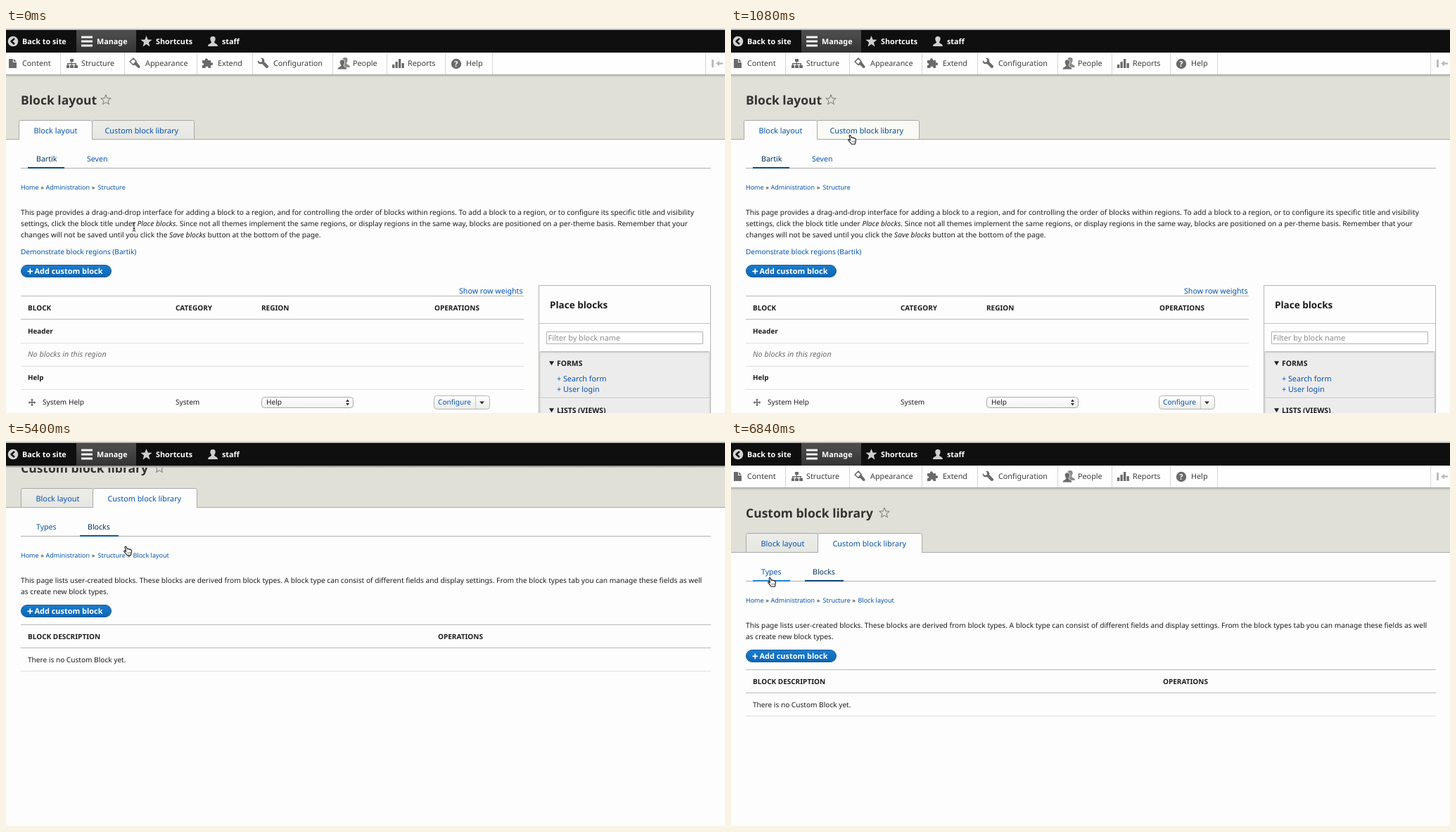
An HTML page with a canvas for the animation above (8000 ms loop, 1022x548 px).

```html
<!DOCTYPE html>
<html lang="en">
<head>
<meta charset="utf-8">
<title>Block layout</title>
<style>
html, body { margin: 0; width: 100%; height: 100%; overflow: hidden; background: #fdfdfd; }
canvas { display: block; }
</style>
</head>
<body>
<canvas id="stage" width="1022" height="548"></canvas>
<script>
const ctx = document.getElementById('stage').getContext('2d');
const LOOP = 8000;
const INK = '#1c1c1c', LINK = '#0652ae', DARK = '#06315c', PAGE = '#fdfdfd', ICON = '#6a6a6a';
const PRIMARY = ['#1c7dcf', '#0c65b3'];

function rect(x, y, w, h, color) {
  ctx.fillStyle = color;
  ctx.fillRect(x, y, w, h);
}

function gradient(y, h, top, bottom) {
  const g = ctx.createLinearGradient(0, y, 0, y + h);
  g.addColorStop(0, top);
  g.addColorStop(1, bottom);
  return g;
}

function box(x, y, w, h, radius, fill, border) {
  ctx.beginPath();
  ctx.roundRect(x + .5, y + .5, w - 1, h - 1, radius);
  ctx.fillStyle = fill;
  ctx.fill();
  ctx.strokeStyle = border;
  ctx.lineWidth = 1;
  ctx.stroke();
}

// y is the middle of the capital letters
function text(s, x, y, size = 10.2, color = INK, style = '') {
  ctx.font = `${style} ${size}px "Noto Sans", "Open Sans", sans-serif`;
  ctx.textRendering = 'geometricPrecision';
  ctx.fillStyle = color;
  ctx.fillText(s, x, y + size * .357);
  return x + ctx.measureText(s).width;
}

const bold = (s, x, y, size = 10, color = INK) => text(s, x, y, size, color, 'bold');

// Parts between asterisks are italic
function rich(s, x, y) {
  s.split('*').forEach((part, i) => { x = text(part, x, y, 10.2, INK, i % 2 ? 'italic' : ''); });
}

function shape(d, x, y, fill, stroke, width = 1) {
  const path = new Path2D(d);
  ctx.save();
  ctx.translate(x, y);
  ctx.lineWidth = width;
  ctx.lineJoin = 'round';
  if (fill) { ctx.fillStyle = fill; ctx.fill(path); }
  if (stroke) { ctx.strokeStyle = stroke; ctx.stroke(path); }
  ctx.restore();
}

function disc(x, y, r, color) {
  ctx.beginPath();
  ctx.arc(x, y, r, 0, Math.PI * 2);
  ctx.fillStyle = color;
  ctx.fill();
}

function star(x, y, r, fill, stroke) {
  let d = '';
  for (let i = 0; i < 10; i++) {
    const a = i * Math.PI / 5, k = i % 2 ? r * .42 : r;
    d += `${i ? 'L' : 'M'}${Math.sin(a) * k} ${-Math.cos(a) * k}`;
  }
  shape(d + 'Z', x, y, fill, stroke);
}

const person = 'M0-7C3-7 4-5 3.6-2.4C3.3-.6 2.2.6 2 1.6C2.2 3 7 3.4 7 7H-7C-7 3.4-2.2 3-2 1.6C-2.2.6-3.3-.6-3.6-2.4C-4-5-3-7 0-7Z';

function toolbar() {
  rect(0, 3, 1022, 32, '#0f0f0f');
  rect(100, 3, 85, 32, gradient(9, 26, '#4b4b4b', '#333'));
  disc(10, 19, 7.3, '#d4d4d4');
  shape('M2-4L-2.5 0L2 4', 10, 19, null, '#111', 2.4);
  for (const y of [11.5, 17.5, 23.5]) rect(107, y, 16, 3, '#f4f4f4');
  star(199.5, 19.5, 8.5, '#cfcfcf');
  shape(person, 294, 19, '#cfcfcf');
  [['Back to site', 23], ['Manage', 129], ['Shortcuts', 213], ['staff', 307]]
    .forEach(([s, x]) => bold(s, x, 19, 10.8, '#fff'));
}

function trayIcons() {
  shape('M0 0H6V5H11V13H0ZM7 0L11 4H7Z', 4, 44, ICON);
  shape('M5 0H10V4H8V6H14V9H16V13H11V9H12.5V7.5H8.2V9H10V13H5V9H6.8V7.5H2.5V9H4V13H0V9H1V6H6.8V4H5Z', 86, 44, ICON);
  shape('M0 5L5 0L9 4.5L5 9.5Z', 176, 43, null, ICON, 1.6);
  shape('M5 9.5L9 4.5L14.5 11.5C15 13.5 13 15 11.5 13.5L7.5 9.8Z', 176, 43, ICON);
  shape('M0 3H4C2.5 0 8.5-1.5 8 3H12V6.5C16 5 16.5 11 12 10V14H8.5C9 10.5 4 10.5 4.5 14H0V10C3 10.5 3 6.5 0 7Z', 279, 43, ICON);
  shape('M0 3L3 6L6 5L6 2L4 0C8-1 10 2 9 5L15 11C16 13 13 15 11.5 13.5L6 8C2 9-1 7 0 3Z', 358, 43, ICON);
  shape(person, 482, 49, '#8c8c8c');
  shape(person, 478, 52, ICON, '#fff', .8);
  [5, 9, 13, 7].forEach((h, i) => rect(549 + i * 4.5, 57 - h, 3.3, h, ICON));
  disc(640, 51, 7.2, ICON);
  bold('?', 637.2, 51, 11, '#fff');
  rect(1003, 45, 3, 11, '#bcbcbc');
  shape('M0 0L5-4V-1.3H10V1.3H5V4Z', 1009, 50.5, '#bcbcbc');
}

function tray() {
  rect(0, 35, 1022, 32, '#fefefe');
  rect(0, 66, 1022, 1, '#a9a9a7');
  rect(0, 67, 1022, 1, '#b9b9b4');
  rect(0, 68, 1022, 2, '#d2d2cb');
  for (const x of [77, 168, 271, 350, 464, 541, 624, 691, 994]) rect(x, 35, 1, 31, '#d6d6d6');
  [['Content', 23], ['Structure', 107], ['Appearance', 198], ['Extend', 301], ['Configuration', 380],
   ['People', 493], ['Reports', 571], ['Help', 654]].forEach(([s, x]) => text(s, x, 50.5, 10.8, '#3c3c3c'));
  trayIcons();
}

function pageHeader(title, starX) {
  rect(0, 3, 1022, 155, '#e0e0d8');
  rect(0, 158, 1022, 1, '#a9a9a4');
  bold(title, 21, 102.5, 17.5, '#333');
  star(starX, 102.5, 7.6, null, '#777');
}

function tab(label, x, w, textX, active, hover) {
  const fill = active ? PAGE : hover ? '#f9faf5' : gradient(131, 28, '#ecece9', '#e6e6e3');
  box(x, 131, w, 28, [2, 2, 0, 0], fill, '#a9a9a4');
  if (active) rect(x + 1, 157, w - 2, 3, PAGE);
  text(label, textX, 146, 10.85, hover ? '#084a94' : LINK);
}

const underline = (x, w, color) => rect(x, 198, w, 2, color);

function subTabs(labels) {
  rect(21, 199, 981, 1, '#adadad');
  for (const [s, x, color] of labels) text(s, x, 186.5, 10.6, color);
}

function breadcrumb(items) {
  items.forEach(([s, x], i) => {
    const end = text(s, x, 226.5, 9, LINK);
    if (i < items.length - 1) text('»', end + 2.6, 226.5, 9);
  });
}

function addButton(y) {
  box(21, y, 129, 18, 9, gradient(y, 18, ...PRIMARY), '#1a5c96');
  bold('+', 29.7, y + 9, 16, '#fff');
  bold('Add custom block', 40.5, y + 9.2, 10.95, '#fff');
}

function blockTable() {
  text('Show row weights', 644, 374, 10.65, LINK);
  [[381, '#b9b9b5'], [414, '#b9b9b5'], [448, '#dededb'], [481, '#dededb'], [514, '#dededb']]
    .forEach(([y, color]) => rect(21, y, 715, 1, color));
  [['BLOCK', 31], ['CATEGORY', 241], ['REGION', 363], ['OPERATIONS', 609]].forEach(([s, x]) => bold(s, x, 398, 10));
  bold('Header', 31, 431.5, 9.8);
  text('No blocks in this region', 31, 464.5, 10.75, '#6a6a6a', 'italic');
  bold('Help', 31, 497.5, 9.8);
  shape('M0-5.5L2-3H.7V-.7H3V-2L5.5 0L3 2V.7H.7V3H2L0 5.5L-2 3H-.7V.7H-3V2L-5.5 0L-3-2V-.7H-.7V-3H-2Z', 37, 533, '#666');
  text('System Help', 52, 532.5, 10.1);
  text('System', 241, 532.5, 10.1);
  box(363, 525, 131, 16, 4, gradient(525, 16, '#fff', '#f1f1f1'), '#a8a8a8');
  text('Help', 370, 532.5, 10.1);
  shape('M-2.5-1L0-4.5L2.5-1ZM-2.5 1L0 4.5L2.5 1Z', 485.5, 533, '#333');
  box(608, 523, 80, 20, 4, gradient(523, 20, '#fff', '#ebebe8'), '#b4b4b0');
  text('Configure', 614, 532.5, 10.1, LINK);
  rect(667, 524, 1, 18, '#c6c6c2');
  shape('M-3.5-2H3.5L0 2Z', 676.5, 533.5, '#333');
}

function sidebar() {
  box(757, 366, 245, 190, 0, PAGE, '#b5b5b2');
  bold('Place blocks', 773, 394, 13.5);
  rect(758, 420, 243, 1, '#c2c2be');
  box(768, 432, 223, 18, 0, '#fff', '#b3b3b0');
  text('Filter by block name', 770.5, 441, 10.9, '#8c8c8c');
  rect(758, 460, 243, 88, '#ececec');
  rect(758, 460, 243, 3, gradient(460, 3, '#b8b8b6', '#e9e9e9'));
  rect(758, 460, 2, 88, '#dcdcda');
  rect(999, 460, 2, 88, '#dcdcda');
  rect(758, 526, 243, 1, '#c2c2c0');
  rect(758, 527, 243, 1, '#f8f8f8');
  for (const [s, y] of [['FORMS', 477], ['LISTS (VIEWS)', 544]]) {
    shape('M-3.5-2.8H3.5L0 3.2Z', 775.5, y, '#222');
    bold(s, 783, y, 10.4);
  }
  text('+ Search form', 783, 499, 10.75, LINK);
  text('+ User login', 783, 514, 10.75, LINK);
}

function layoutPage(hover) {
  pageHeader('Block layout', 142);
  tab('Custom block library', 122, 146, 140.5, false, hover === 'library');
  tab('Block layout', 18, 105, 39.5, true);
  subTabs([['Bartik', 43, DARK], ['Seven', 115, LINK]]);
  underline(31, 52, '#0b4a80');
  if (hover === 'seven') underline(104, 52, '#1b84d8');
  breadcrumb([['Home', 21], ['Administration', 56.5], ['Structure', 130.5]]);
  rich('This page provides a drag-and-drop interface for adding a block to a region, and for controlling the order of blocks within regions. To add a block to a region, or to configure its specific title and visibility', 21, 262);
  rich('settings, click the block title under *Place blocks*. Since not all themes implement the same regions, or display regions in the same way, blocks are positioned on a per-theme basis. Remember that your', 21, 278);
  rich('changes will not be saved until you click the *Save blocks* button at the bottom of the page.', 21, 294);
  text('Demonstrate block regions (Bartik)', 21, 318.5, 10.05, LINK);
  addButton(337);
  blockTable();
  sidebar();
}

function libraryPage(blocksLine, typesHover) {
  pageHeader('Custom block library', 218);
  tab('Block layout', 21, 103, 42.5, false);
  tab('Custom block library', 123, 149, 144.5, true);
  subTabs([['Types', 43, LINK], ['Blocks', 116, DARK]]);
  underline(105, 55, blocksLine);
  if (typesHover) underline(31, 53, '#1b84d8');
  breadcrumb([['Home', 21], ['Administration', 56.5], ['Structure', 130.5], ['Block layout', 180.5]]);
  rich('This page lists user-created blocks. These blocks are derived from block types. A block type can consist of different fields and display settings. From the block types tab you can manage these fields as well', 21, 262);
  rich('as create new block types.', 21, 278);
  addButton(297);
  [[325, '#b9b9b5'], [358, '#b9b9b5'], [391, '#dededb']].forEach(([y, color]) => rect(21, y, 981, 1, color));
  bold('BLOCK DESCRIPTION', 31, 342);
  bold('OPERATIONS', 614, 342);
  text('There is no Custom Block yet.', 31, 375, 10.1);
}

const cursors = {
  beam(x, y) {
    shape('M-2.5-6C-1-6 0-5.5 0-4.5V5C0 5.7-1 6-2.5 6M2.5-6C1-6 0-5.5 0-4.5M0 5C0 5.7 1 6 2.5 6M-1.5 2.5H1.5', x, y, null, '#222', 1);
  },
  arrow(x, y) {
    shape('M0 0V12.2L2.9 9.6L4.9 14L6.9 13.2L5 9H9Z', x, y, '#111', '#fff', .8);
  },
  hand(x, y) {
    shape('M2.2 2.2C1.6.6 3.6 0 4.2 1.4L5.2 4.2C6.4 3.5 7.2 4 7.5 4.6C8.5 4 9.2 4.5 9.6 5.1C11 4.7 11.4 5.8 11.4 7.5C11.4 9.8 10.8 10.6 10.5 13.2H5.2C4.4 11.4 2.5 10 .9 8C.1 6.8 1.6 6.2 2.6 7L3.6 7.8Z', x, y, '#fff', '#161616', 1.1);
    shape('M6 8.5V11M7.8 8.5V11M9.5 8.5V11', x, y, null, '#555', .7);
  }
};

function layout(hover) {
  layoutPage(hover);
  tray();
  toolbar();
}

function library(blocksLine, typesHover) {
  libraryPage(blocksLine, typesHover);
  tray();
  toolbar();
}

function libraryLoading() {
  ctx.save();
  ctx.translate(0, -64);
  libraryPage('#0f5795');
  ctx.restore();
  rect(0, 35, 1022, 3, gradient(35, 3, '#777773', '#dcdcd4'));
  toolbar();
}

const steps = [
  [0, () => layout(), 'beam', 182, 283],
  [360, () => layout(), 'arrow', 138, 204.5],
  [720, () => layout('seven'), 'hand', 133.5, 193],
  [1080, () => layout('library'), 'hand', 166, 152],
  [1440, () => layout('library'), 'hand', 167, 149.5],
  [5040, () => {}, 'hand', 167, 149.5],
  [5400, libraryLoading, 'hand', 167, 149.5],
  [5760, () => library('#0f5795'), 'hand', 135, 194.5],
  [6120, () => library('#0b3f70'), 'arrow', 150, 200.5],
  [6480, () => library('#0b3f70', true), 'hand', 53, 195],
  [6840, () => library('#0b3f70', true), 'hand', 52, 194]
];

let shown;
function frame() {
  const t = performance.now() % LOOP;
  const step = steps.findLast(([start]) => start <= t);
  if (step !== shown) {
    shown = step;
    const [, scene, cursor, x, y] = step;
    rect(0, 0, 1022, 548, PAGE);
    scene();
    rect(0, 0, 1022, 2, '#dedfdc');
    rect(0, 2, 1022, 1, '#979797');
    cursors[cursor](x, y);
  }
  requestAnimationFrame(frame);
}
frame();
</script>
</body>
</html>
```
